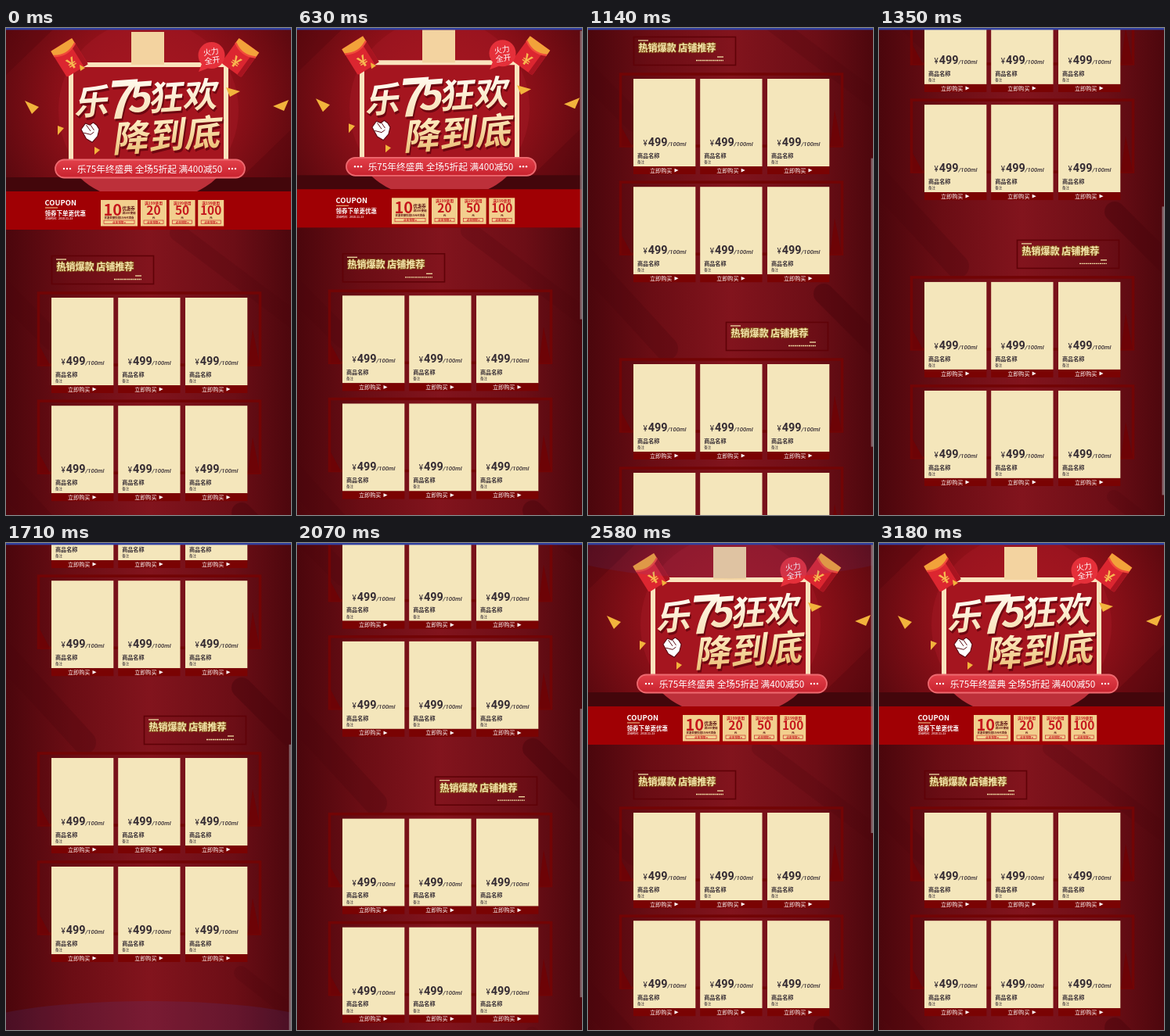
These frames come from a looping animation (364 by 623 pixels, 3.66 s). An HTML page:

```html
<!DOCTYPE html>
<html lang="zh-CN">
<head>
<meta charset="utf-8">
<title>商品页滚动</title>
<style>
html, body { margin: 0; width: 100%; height: 100%; overflow: hidden; background: #5b0a10; }
svg { display: block; width: 364px; height: 623px; }
text { font-family: "Noto Sans CJK SC", "Noto Sans CJK", sans-serif; white-space: pre; }
.num { font-family: Roboto, sans-serif; }
</style>
</head>
<body>
<svg id="stage" viewBox="0 0 364 623" xmlns="http://www.w3.org/2000/svg">
  <defs>
    <radialGradient id="sky" gradientUnits="userSpaceOnUse" cx="182" cy="95" r="215">
      <stop offset="0" stop-color="#b0161f"/><stop offset=".45" stop-color="#94111a"/>
      <stop offset=".75" stop-color="#720c13"/><stop offset="1" stop-color="#56080e"/>
    </radialGradient>
    <linearGradient id="wall">
      <stop offset="0" stop-color="#4b060c"/><stop offset=".22" stop-color="#6a0d14"/><stop offset=".5" stop-color="#82141d"/>
      <stop offset=".8" stop-color="#6c0e16"/><stop offset="1" stop-color="#4d070d"/>
    </linearGradient>
    <linearGradient id="cream" x2="0" y2="1">
      <stop offset=".3" stop-color="#fff8ea"/><stop offset="1" stop-color="#f6d9a8"/>
    </linearGradient>
    <linearGradient id="gold" x2="0" y2="1">
      <stop offset=".2" stop-color="#ffefc8"/><stop offset="1" stop-color="#e8b668"/>
    </linearGradient>
    <linearGradient id="pill" x2="0" y2="1">
      <stop offset="0" stop-color="#e2404a"/><stop offset="1" stop-color="#c8222e"/>
    </linearGradient>
  </defs>
  <g id="page"></g>
  <ellipse id="glow" cx="182" rx="230" fill="#4a4ab0"/>
  <rect id="thumb" x="361.5" width="2.5" height="369" fill="#a09498" opacity="0"/>
  <rect width="364" height="2.4" fill="#3040a0"/>
</svg>
<script>
const LOOP = 3660, STEP = 30, END = 435;
const $ = id => document.getElementById(id);

const rect = (x, y, w, h, fill, more = '') =>
  `<rect x="${x}" y="${y}" width="${w}" height="${h}" fill="${fill}" ${more}/>`;
const path = (d, fill, more = '') => `<path d="${d}" fill="${fill}" ${more}/>`;
const text = (x, y, size, fill, str, more = '') =>
  `<text x="${x}" y="${y}" font-size="${size}" fill="${fill}" ${more}>${str}</text>`;
const group = (move, inner) => `<g transform="${move}">${inner}</g>`;
const BOLD = 'font-weight="700"', BLACK = 'font-weight="900"', MID = 'text-anchor="middle"';

function envelope(x, y, turn, size) {
  return group(`translate(${x} ${y}) rotate(${turn}) scale(${size})`,
    rect(-13, -16, 26, 32, '#dc2630', 'rx="2"') +
    path('M13-16V16H8V-16Z', '#a81420') +
    path('M-13-16H13V-10Q0-2-13-10Z', '#f2a23a') +
    path('M-13-10Q0-2 13-10', 'none', 'stroke="#f04b3a" stroke-width="2"') +
    text(-1, 12, 16, '#f8b850', '¥', MID + ' ' + BOLD));
}

function headline() {
  const word = (x, y, size, fill, str) =>
    text(x + 2, y + 3, size, '#6d0610', str, BLACK) +
    text(x, y, size, `url(#${fill})`, str, BLACK);
  const lean = (x, y, inner) => group(`translate(${x} ${y}) rotate(-4) skewX(-12)`, inner);
  return lean(87, 112, word(0, 0, 44, 'cream', '乐') + word(40, 8, 66, 'cream', '7') +
      word(68, 1, 52, 'cream', '5') + word(95, 1, 44, 'cream', '狂欢')) +
    lean(136, 159, word(0, 0, 46, 'gold', '降到底'));
}

function banner() {
  const bits = ['24 93 42 101 33 110', '341 100 361 92 355 106', '281 76 299 81 286 88',
    '66 125 74 128 66 137', '94 47 101 51 95 55', '113 152 120 156 113 162'];
  return rect(0, 0, 364, 209, 'url(#sky)') +
    path('M0 60L60 2H0ZM364 130L300 192H364Z', '#4e060c', 'opacity=".3"') +
    '<circle cx="182" cy="105" r="115" fill="#a31824" opacity=".5"/>' +
    rect(0, 191, 364, 18, '#43060b') +
    path('M94 191H270Q259 202 244 209H120Q105 202 94 191Z', '#bd303a') +
    path('M83 180V47H281V180', '#a5151f', 'stroke="#fae3bd" stroke-width="6" stroke-linejoin="round"') +
    rect(160, 5, 42, 42, '#f3d3a0') +
    envelope(81, 38, -32, 1.22) + envelope(299, 38, 36, 1.22) +
    bits.map(p => `<polygon points="${p}" fill="#f2b33c"/>`).join('') +
    headline() +
    group('translate(107.5 133) scale(1.1) translate(-107.5 -133)',
      path('M97 130L102 123L107 125L111 122L115 125L118 130L116 138L110 145L103 141Z', '#fff', 'stroke="#5c0a12"') +
      path('M103 125L108 132M108 125L112 131M100 134L108 136L112 133', 'none', 'stroke="#5c0a12" stroke-width=".9"')) +
    path('M250 46L246 56L259 51Z', '#e5303a') +
    '<circle cx="262.5" cy="35" r="17" fill="#e5303a"/>' +
    group('translate(262.5 35) rotate(-9)', text(0, -1, 10, '#fff', '火力', MID) + text(0, 10, 10, '#fff', '全开', MID)) +
    rect(63, 168.5, 242, 23, 'url(#pill)', 'rx="11.5" stroke="#ee6a70" stroke-width="1.8"') +
    text(183.5, 184.5, 11.7, '#fff', '乐75年终盛典 全场5折起 满400减50', MID + ' font-weight="500"') +
    [74, 78, 82, 285, 289, 293].map(x => `<circle cx="${x}" cy="180" r="1.2" fill="#fff"/>`).join('');
}

function coupons() {
  const red = '#c5161c', mid = (x, y, size, fill, str) => text(x, y, size, fill, str, MID + ' ' + BOLD);
  const ticket = (x, w) => rect(x, 220, w, 33.5, '#f2cf8e') +
    rect(x + 4, 246, w - 8, 4.5, 'none', `stroke="${red}" stroke-width=".6"`) +
    mid(x + w / 2, 249.8, 3.6, red, '点击领取 ▸');
  return rect(0, 209, 364, 49, '#a00004') +
    text(49.5, 227, 9.4, '#fff', 'COUPON', BOLD) + rect(50, 229.5, 16, 1, '#f2cf8e') +
    text(49.5, 239.7, 7.5, '#fff', '领券下单更优惠', BOLD) + text(50, 245.3, 3.4, '#f6dada', '活动时间：2018.11.23', BOLD) +
    ticket(121, 47) +
    text(124.5, 239.5, 20, red, '10', BOLD) + text(148.5, 233, 5.4, '#5a1010', '优惠券', BOLD) +
    text(148.5, 238, 3.6, '#5a1010', '满100使用', BOLD) + mid(144.5, 244, 3.4, '#5a1010', '优惠金额仅限10元代金券') +
    ['20', '50', '100'].map((n, i) => {
      const x = 172 + i * 36.6, c = x + 16.5;
      return ticket(x, 33) + mid(c, 225.7, 4.8, red, '满199使用') + mid(c, 239, 15.5, red, n) + mid(c, 244, 3.6, '#5a1010', '元');
    }).join('');
}

function wall() {
  const bar = (x1, y1, x2, y2, w, alpha) =>
    `<path d="M${x1} ${y1}L${x2} ${y2}" stroke="#4c060d" stroke-width="${w}" stroke-linecap="round" opacity="${alpha}"/>`;
  return rect(0, 258, 364, 810, 'url(#wall)') +
    bar(220, 262, 370, 375, 22, .2) + bar(-10, 330, 60, 400, 26, .2) +
    bar(301, 620, 385, 704, 26, .5) + bar(-10, 570, 100, 690, 30, .28) +
    bar(300, 985, 370, 1040, 18, .2);
}

function heading(dx, dy) {
  const dash = 'stroke-dasharray="2 .6"';
  const rule = (x1, x2, y, more = '') => `<path d="M${x1} ${y}H${x2}" stroke="#f0dda4" stroke-width="1.3" ${more}/>`;
  return group(`translate(${dx} ${dy})`,
    rect(58.5, 291.5, 130, 36, 'none', 'stroke="#5f0207" stroke-width="1.6"') +
    rule(64, 77, 296) + rule(165, 173, 317) + rule(138, 173, 321.5, dash) +
    text(64.5, 310, 12, '#f6e7ae', '热销爆款 店铺推荐', BOLD + ' stroke="#8a5a20" stroke-width="1.6" paint-order="stroke"'));
}

function card(x, y) {
  const ink = '#352c33';
  return rect(x, y, 79.3, 112, '#f4e6bb') + rect(x, y + 112, 79.3, 10, '#7a0303') +
    text(x + 12.5, y + 86, 10, ink, '¥', 'class="num"') +
    text(x + 18.8, y + 86, 14.4, ink, '499', 'class="num" ' + BOLD) +
    text(x + 43.4, y + 86, 7.7, ink, '/100ml', 'class="num" font-weight="500" font-style="italic"') +
    text(x + 5, y + 100.8, 7.1, ink, '商品名称', BOLD) +
    text(x + 5, y + 108, 4.5, ink, '备注') +
    text(x + 21, y + 119.6, 7.1, '#fff', '立即购买', 'font-weight="500"') +
    path(`M${x + 52.5} ${y + 114.7}l5 2.4l-5 2.4z`, '#fff');
}

function row(y) {
  return rect(41.5, y - 6, 283, 92, 'none', 'stroke="#720405" stroke-width="3.5"') +
    path(`M309 ${y + 86}L315 ${y + 40}L324 ${y + 86}ZM43 ${y + 62}L56 ${y + 86}H43Z`, '#6d0306') +
    [58, 143.2, 229].map(x => card(x, y)).join('');
}

$('page').innerHTML = wall() + banner() + coupons() + heading(0, 0) + heading(118, 365) +
  [345, 483.2, 710, 849].map(row).join('');

// time, scroll offset, speed in px per ms
const TRACK = [
  [600, 0, 0], [630, 2.7, .15], [870, 118.5, .58], [1140, 280, .58], [1500, END, .25],
  [1501, END, 0], [1980, END, 0], [2010, 422, .8], [2220, 136, 1.35], [2370, 0, .5]
].map(([t, y, v]) => [t, y, t > 1980 ? -v : v]);

function scrollAt(t) {
  const i = TRACK.findIndex(k => k[0] > t);
  if (i < 1) return 0;
  const [t0, y0, v0] = TRACK[i - 1], [t1, y1, v1] = TRACK[i];
  const d = t1 - t0, u = (t - t0) / d, w = 1 - u;
  const y = w * w * ((1 + 2 * u) * y0 + u * d * v0) + u * u * ((3 - 2 * u) * y1 - w * d * v1);
  return Math.max(0, Math.min(END, y));
}

// edge glow: quick rise, then linear retreat
const pulse = (t, hit, peak, end) =>
  Math.max(0, t < peak ? (t - hit) / (peak - hit) : (end - t) / (end - peak));

function draw(t) {
  const y = scrollAt(t), low = t < 2000;
  $('page').setAttribute('transform', `translate(0 ${-y.toFixed(2)})`);
  const g = low ? pulse(t, 1500, 1600, 1860) : pulse(t, 2370, 2470, 2670);
  $('glow').setAttribute('cy', low ? 623 : 2);
  $('glow').setAttribute('ry', g * (low ? 64 : 96));
  $('glow').setAttribute('opacity', g * .25);
  const fade = t < 630 ? 0 : Math.max(0, Math.min(1, (3180 - t) / 390));
  $('thumb').setAttribute('y', 2 + y * .588);
  $('thumb').setAttribute('opacity', fade * .65);
}

const start = performance.now();
function tick() {
  const t = (performance.now() - start) % LOOP;
  draw(Math.floor(t / STEP) * STEP);
  requestAnimationFrame(tick);
}
tick();
</script>
</body>
</html>
```
